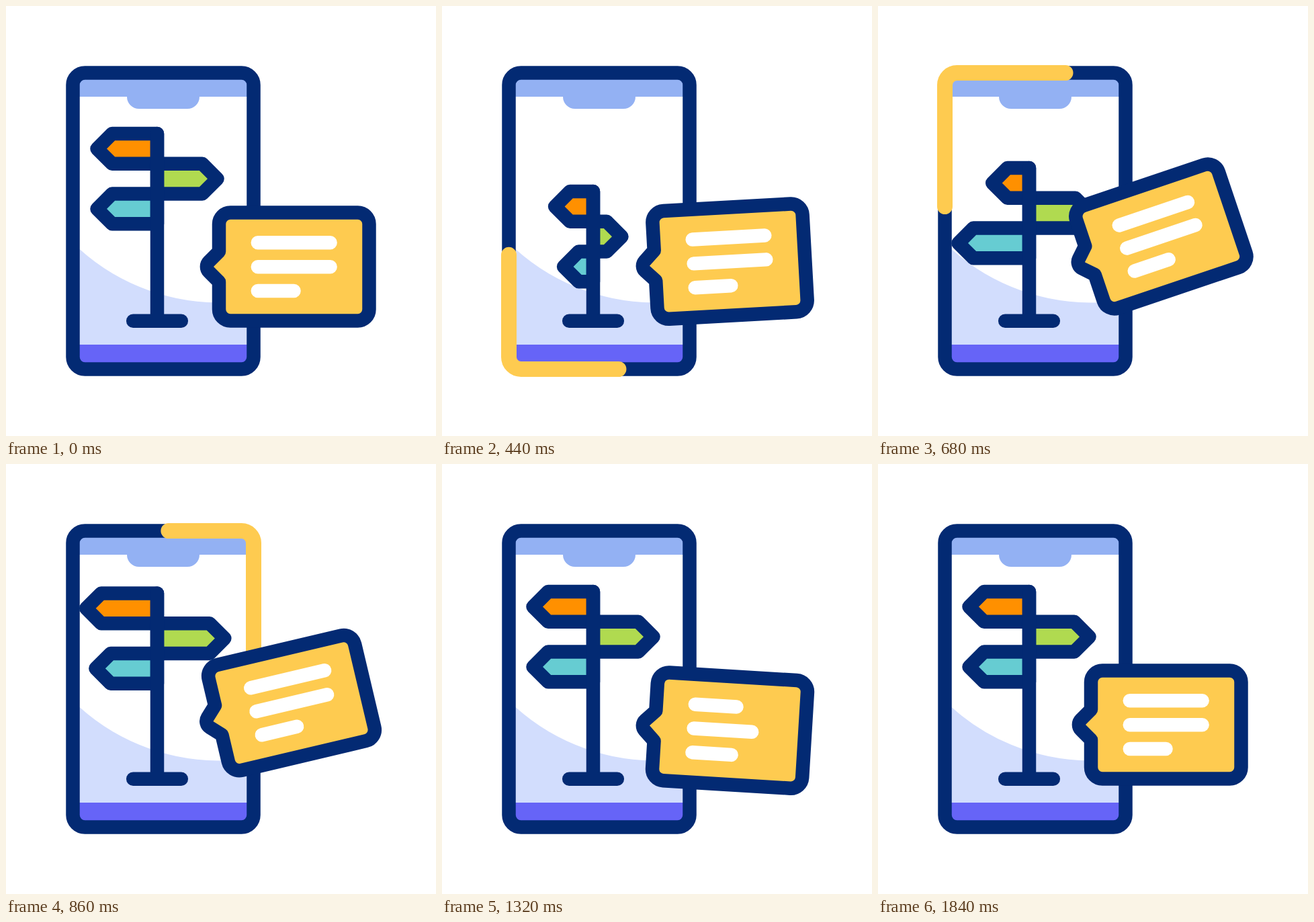
Recreate the animation shown at these times as an HTML page. Size 640x640 px, loop 2.4 s.

```html
<!DOCTYPE html>
<html lang="en">
<head>
<meta charset="utf-8">
<title>Signpost phone</title>
<style>
  html, body { margin: 0; height: 100%; overflow: hidden; background: #fff; }
  svg { display: block; width: 100%; height: 100%; }
  .ink { stroke: #032a73; stroke-width: 20.5; stroke-linecap: round; stroke-linejoin: round; }
</style>
</head>
<body>
<svg viewBox="0 0 640 640" fill="none">
  <clipPath id="screen"><rect x="99.5" y="99.5" width="269" height="441" rx="18"/></clipPath>
  <g clip-path="url(#screen)">
    <path d="M99 352A311 311 0 0 0 315 441.5H369V541H99Z" fill="#d2ddfd"/>
    <path d="M99 99H369V135H288A18 18 0 0 1 270 153H198A18 18 0 0 1 180 135H99Z" fill="#93b1f3"/>
    <path d="M99 504H369V541H99Z" fill="#6664f7"/>
  </g>
  <rect class="ink" x="99.5" y="99.5" width="269" height="441" rx="18"/>
  <path id="trace" pathLength="1" stroke="#fecb50" stroke-width="23" stroke-linecap="round"
    d="M368.5 448V522.5A18 18 0 0 1 350.5 540.5H117.5A18 18 0 0 1 99.5 522.5V117.5A18 18 0 0 1 117.5 99.5H350.5A18 18 0 0 1 368.5 117.5V448"/>

  <g id="signs" class="ink">
    <path fill="#ff9000"/>
    <path fill="#b0da50"/>
    <path fill="#66ccd2"/>
  </g>
  <path id="pole" class="ink"/>
  <path class="ink" d="M189.2 468.7H260.8"/>

  <g id="bubble">
    <path class="ink" fill="#fecb50"
      d="M334 307.5H523.5A17 17 0 0 1 540.5 324.5V451.5A17 17 0 0 1 523.5 468.5H334A17 17 0 0 1 317 451.5V410.5L302 395.5A10.6 10.6 0 0 1 302 380.5L317 365.5V324.5A17 17 0 0 1 334 307.5Z"/>
    <g id="lines" stroke="#fff" stroke-width="20.5" stroke-linecap="round">
      <path/><path/><path/>
    </g>
  </g>
</svg>
<script>
const LOOP = 2400;
const $ = id => document.getElementById(id);
const signs = [...$('signs').children];
const lines = [...$('lines').children];

const ease = u => {
  u = Math.min(1, Math.max(0, u));
  return u * u * (3 - 2 * u);
};

// Eased value through [time, value] keys, held outside their range
function track(keys, t) {
  let value = keys[0][1];
  for (let i = 1; i < keys.length; i++) {
    const [t0, v0] = keys[i - 1], [t1, v1] = keys[i];
    if (t >= t0) value = v0 + (v1 - v0) * ease((t - t0) / (t1 - t0));
  }
  return value;
}

const DROP = [[0, 0], [500, 89.5], [900, 0]];
const SHRINK = [[0, 0], [400, 50], [660, -16.3], [920, 0]];
const TILT = [[0, 0], [248, 5], [752, -20], [1110, 10.2], [1458, 0]];
const STRETCH = [[740, 0], [1100, 0.18], [1350, -0.45], [1680, 0]];

function draw(t) {
  const tail = ease((t - 183) / 1110), head = ease((t + 18) / 1110);
  $('trace').setAttribute('stroke-dasharray', `${head - tail} 3`);
  $('trace').setAttribute('stroke-dashoffset', -tail);

  const top = 190 + track(DROP, t);
  $('pole').setAttribute('d', `M225 ${top}V468.7`);

  signs.forEach((sign, i) => {
    const side = i === 1 ? 1 : -1;
    const reach = 89.5 - track(SHRINK, t - (2 - i) * 100);
    const tip = 225 + side * reach, neck = tip - side * 22.4;
    const y = top + i * 44.75;
    sign.setAttribute('d', `M225 ${y}H${neck}L${tip} ${y + 22.4}L${neck} ${y + 44.75}H225Z`);
  });

  $('bubble').setAttribute('transform', `rotate(${track(TILT, t)} 288 388)`);
  lines.forEach((line, i) => {
    const length = (i < 2 ? 107.8 : 53.7) * (1 + track(STRETCH, t - i * 80));
    line.setAttribute('d', `M374.8 ${352.3 + i * 35.9}h${length}`);
  });
}

function frame() {
  draw(performance.now() % LOOP);
  requestAnimationFrame(frame);
}
frame();
</script>
</body>
</html>
```
